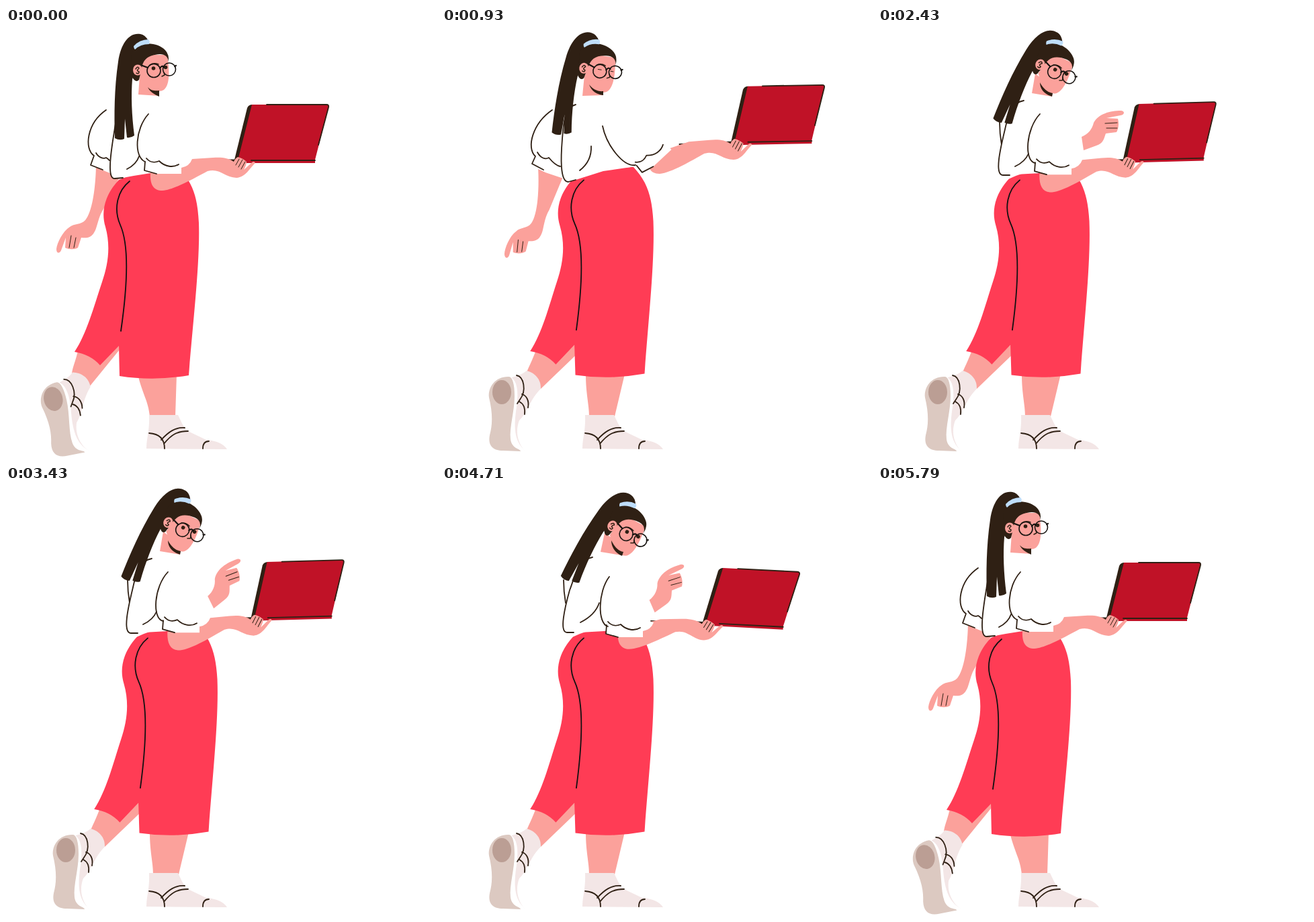
Write an HTML page that moves like this. It is 640 px wide and 640 px high and loops after 6000 ms.

```html
<!DOCTYPE html>
<html lang="en">
<head>
<meta charset="utf-8">
<title>Woman with a laptop</title>
<style>
html, body { margin: 0; width: 100%; height: 100%; overflow: hidden; background: #fff; }
svg { display: block; width: 100vw; height: 100vh; }
.skin { fill: #fba19b; }
.dark { fill: #2f2014; }
.white { fill: #fff; }
.shoe { fill: #f3e6e6; }
.red { fill: #c01227; }
.line { fill: none; stroke: #2f2014; stroke-width: 1.8; stroke-linecap: round; stroke-linejoin: round; }
.thin { stroke-width: 1; }
</style>
</head>
<body>
<svg viewBox="0 0 640 640">
  <g id="farArm">
    <path class="skin" d="M134 206C133 245 127 275 118 286C112 293 101 291 95 296C84 303 76 320 75 329C75 336 80 336 82 331L89 312L88 327C94 330 102 330 107 327L112 312C121 313 130 313 135 295C139 282 140 277 146 268L169 222L145 212Z"/>
    <path class="line thin" d="M97 309L94 327M104 312L101 327"/>
  </g>
  <path id="farSleeve" class="line" style="fill:#fff"/>
  <g id="reach">
    <g id="wave">
      <path class="skin" d="M303 162C313 158 319 150 321 141C328 128 345 123 362 123C368 124 367 129 361 130L340 134L357 135C359 142 358 150 355 155L339 157C336 165 336 171 325 175L306 182Z"/>
      <path class="line thin" d="M338 142L356 141M340 149L356 149"/>
    </g>
  </g>

  <path id="calf" class="skin"/>
  <path id="farCalf" class="skin"/>
  <g id="farFoot">
    <path class="shoe" d="M126 510C138 513 148 523 147 537C132 551 126 574 115 584C108 602 114 620 124 630L100 610L104 520Q118 517 126 510Z"/>
    <path class="white" d="M100 519C113 522 114 545 111 564C107 590 106 615 124 629Q122 631 114 630L98 610Z"/>
    <path fill="#dcc9c1" d="M100 519C80 518 68 534 70 550C76 575 75 592 71 606C68 622 76 629 91 629L117 630C117 626 104 627 102 612C100 595 108 570 108 548C108 530 105 520 100 519Z"/>
    <ellipse cx="89" cy="542" rx="14" ry="18" fill="#bb9e94"/>
    <path class="line" d="M111 517C122 519 126 540 116 553L112 559M119 545C126 547 130 555 128 565M115 556C121 559 124 566 123 575"/>
  </g>
  <path class="shoe" d="M213 576H256C262 588 265 598 275 602L298 613C314 614 325 620 329 627L209 626C209 610 214 600 213 576Z"/>
  <path class="line" d="M213 603C228 604 236 612 236 626M231 613C242 601 252 594 266 595M235 619C246 605 255 600 271 600M293 626C293 618 296 615 302 615"/>

  <g id="skirt">
    <path fill="#ff3c55" d="M168 226C150 245 140 270 148 296C156 325 152 352 143 378C130 417 120 455 102 482Q126 486 140 502L168 473L169 518Q220 526 272 517C278 440 289 350 287 290C285 255 280 233 258 209L215 212Q190 216 168 226Z"/>
    <path class="line" style="stroke:#111" d="M184 228C165 243 160 270 170 293C183 322 182 375 171 451"/>
  </g>

  <path id="torso" class="white"/>
  <path id="back" class="line"/>
  <path id="chest" class="line"/>

  <g id="forearm">
    <path class="line" d="M263 198.5L340 197"/>
    <path class="dark" d="M328 195.500H345V199H335Z"/>
    <path class="dark" d="M340 196L359 119Q361 114 367 114L347 199Z"/>
    <path class="red" d="M366 114H477Q481 114 480 118L460 196V201H357L345 197Z"/>
    <path class="line" d="M388 114H477Q481 114 480 118L465 174M365 197H460"/>
    <path class="skin" d="M215 214C214 231 218 242 233 242C250 241 281 223 300 213C318 208 325 222 343 223C357 222 362 209 371 201Q369 197 365 201L354 211C356 207 358 203 358 199Q353 194 345 192Q341 194 339 199C331 193 320 192 308 193L277 195L240 207Z"/>
    <path class="line thin" d="M347 195L342 204M352 196L346 207M356 199L350 210"/>
  </g>
  <g id="cuff">
    <path class="white" d="M207 198L206 212L224 217L261 217V208Q273 206 277 195L240 185Z"/>
    <path class="line" d="M207 199L206 212L224 217M209 194C216 202 223 200 228 198C237 207 249 208 257 203"/>
  </g>
  <path id="sleeve" class="line"/>

  <path id="neck" class="skin"/>
  <g id="head">
    <g id="pony" class="dark">
      <path d="M200 9C184 6 171 22 167 50C161 90 161 130 162 164Q169 168 176 165L177 135L180 163Q186 164 191 160C187 130 186 100 188 76L203 40L212 19Q207 10 200 9Z"/>
    </g>
    <path class="skin" d="M203 40H240C243 60 245 84 235 92Q232 94 228 94Q218 95 211 88L199 76Z"/>
    <path class="dark" d="M186 40C193 18 225 20 237 33Q243 39 242 51Q241 39 229 39C211 40 204 47 202 60L198 77Q194 82 189 75Z"/>
    <path fill="#bfdefb" d="M190 27Q199 17 212 17Q215 20 213 24Q200 24 192 32Q190 30 190 27Z"/>
    <ellipse class="skin" cx="196" cy="62.500" rx="7" ry="8"/>
    <path class="line" style="stroke-width:1.5" d="M193 61Q196 56 198 60Q193 64 198 65Q198 69 194 67M214 55Q220 51 227 54M232 72L236 70L235 66"/>
    <g id="eyes" class="dark"><circle cx="219.500" cy="60" r="2.800"/><circle cx="237.500" cy="58.500" r="2.800"/></g>
    <path id="lids" class="line thin" d="M217 61H222M236 61H240"/>
    <g class="line" style="stroke:#171310;stroke-width:1.600">
      <circle cx="220" cy="63.500" r="10"/><circle cx="243" cy="61.500" r="9.500"/>
      <path d="M203 56L211 59M229 60Q232 55 235 58M251 57L253 56" stroke-width="2.200"/>
    </g>
  </g>
  <path id="jaw" class="dark"/>
</svg>
<script>
const FRAME = 6000 / 84;

const stand = {
  head: 'translate(0 0) rotate(0 212 100)',
  pony: 'rotate(0 190 20)',
  neck: 'M199 70L197 99L228 101L228 85Z',
  jaw: 'M211 88C215 93 222 94 228 93L228 102C221 99 214 95 211 88',
  forearm: 'translate(0 0) rotate(0 350 205)',
  cuff: 'translate(0 0) rotate(0 207 198)',
  sleeve: 'M212 128C192 150 190 192 207 199',
  chest: 'M180 210Q194 203 198 191',
  back: 'M178 112C166 120 163 140 161 155C156 185 150 226 162 224L174 223',
  hem: 'L190 220L215 216L262 205L270 190L235 100Z',
  farArm: 'translate(0 0) rotate(0 150 125)',
  farSleeve: 'M149 122C120 142 116 180 131 190L126 204L144 211M134 186C138 193 145 195 149 193C151 194 153 196 154 197',
  reach: 'translate(-110 40)',
  skirt: 'translate(0 0) rotate(0 180 230)',
  calf: 'M196 515C203 545 212 555 214 578L252 578L254 515Z',
  farCalf: 'M107 480C104 495 99 505 98 514L124 534L168 480L168 470Z',
  farFoot: 'rotate(-13 124 629)'
};
const stretch = {
  head: 'translate(9.5 -0.7) rotate(8.6 212 100)',
  pony: 'rotate(-0.4 190 20)',
  neck: 'M212 70L209 101L240 100L240 85Z',
  jaw: 'M219 84C224 91 232 95 240 94L240 100C231 99 222 94 219 84',
  forearm: 'translate(90.5 -27) rotate(-1 350 205)',
  cuff: 'translate(82 6) rotate(-43 207 198)',
  sleeve: 'M239 146C245 175 270 207 288 204',
  chest: 'M205 212Q223 198 222 176',
  back: 'M199 114C182 118 181 140 179 165C177 190 175 229 188 229L199 226',
  hem: 'L240 213L288 206L320 180L290 140L250 100Z',
  farArm: 'translate(3.5 3) rotate(-4 150 125)',
  farSleeve: 'M164 122C135 142 125 178 139 191L134 202L151 211M142 185C147 194 154 196 159 193C164 199 170 205 176 206',
  reach: 'translate(-75 25)',
  skirt: 'translate(27 -1.6) rotate(-0.5 180 230)',
  calf: 'M214 515C214 545 219 560 219 578L257 578L272 515Z',
  farCalf: 'M139 482C134 495 130 503 126 512L147 537L198 488L198 470Z',
  farFoot: 'rotate(0 124 629)'
};
const draw = {
  ...stretch,
  head: 'translate(15.7 -3) rotate(15.3 212 100)',
  pony: 'rotate(-1.4 190 20)',
  neck: 'M221 70L217 99L248 100L248 86Z',
  jaw: 'M228 82C233 90 240 95 248 95L248 100C238 99 230 93 228 82',
  forearm: 'translate(67 -9.5) rotate(-1 350 205)',
  cuff: 'translate(61 9) rotate(-20 207 198)',
  sleeve: 'M238 140C234 165 245 207 268 208',
  chest: 'M204 210Q224 198 225 175',
  back: 'M206 111C186 116 187 140 184 155C177 190 175 224 184 224L198 223',
  hem: 'L240 214L270 212L310 195L290 130L250 100Z',
  farArm: 'translate(12 2) rotate(-25 150 125)',
  farSleeve: 'M172 127C150 145 149 190 164 199L161 211L178 216M165 193C167 197 171 199 174 199C175 199 176 199 177 199',
  reach: 'translate(-70 25)'
};
const work = {
  ...stretch,
  head: 'translate(28 -5) rotate(25 212 100)',
  pony: 'rotate(-1.8 190 20)',
  neck: 'M234 68L229 97L259 102L261 88Z',
  jaw: 'M241 81C245 89 252 96 260 97L259 102C249 99 241 92 241 81',
  forearm: 'translate(25 -0.5) rotate(-1.5 350 205)',
  cuff: 'translate(27 1.2) rotate(0 207 198)',
  sleeve: 'M241 128C220 150 217 198 234 201',
  chest: 'M204 206Q219 199 224 187',
  back: 'M217 108C195 112 193 135 188 155C182 180 173 219 186 219L196 219',
  hem: 'L205 218L241 216L290 212L300 185L300 160L270 100Z',
  farArm: 'translate(30 0) rotate(-45 150 125)',
  farSleeve: 'M181 140C181 152 182 163 184 174L184 174L184 174M184 174C184 174 184 174 184 174C184 174 184 174 184 174',
  reach: 'translate(0 0)'
};
const lean = {
  ...work,
  head: 'translate(38 0) rotate(28 212 100)',
  pony: 'rotate(-0.5 190 20)',
  neck: 'M242 70L236 98L267 103L271 89Z',
  jaw: 'M252 81C256 89 262 97 270 98L268 104C259 100 252 92 252 81',
  forearm: 'translate(47.5 7) rotate(3 350 205)',
  cuff: 'translate(38 8) rotate(0 207 198)',
  sleeve: 'M249 135C232 157 231 205 247 209',
  chest: 'M206 203Q228 192 234 174',
  back: 'M224 106C201 111 198 135 190 155C183 180 174 218 186 218L196 218',
  reach: 'translate(8 6)'
};

const el = id => document.getElementById(id);
const clamp = x => Math.min(1, Math.max(0, x));
const ease = (x, n) => x < .5 ? (2 * x) ** n / 2 : 1 - (2 - 2 * x) ** n / 2;
const ramp = (k, from, to, n = 2) => ease(clamp((k - from) / (to - from)), n);

function mix(a, b, p) {
  const end = b.match(/-?[\d.]+/g);
  let i = 0;
  return a.replace(/-?[\d.]+/g, v => (+v + (end[i++] - v) * p).toFixed(2));
}

function blend(a, b, p) {
  const pose = {};
  for (const part in a) pose[part] = mix(a[part], b[part], p);
  return pose;
}

function poseAt(k) {
  if (k <= 13) return blend(stand, stretch, ramp(k, 4, 13));
  if (k <= 29) {
    const p = ramp(k, 13, 29, 3), mid = .335;
    return p < mid ? blend(stretch, draw, p / mid) : blend(draw, work, (p - mid) / (1 - mid));
  }
  if (k <= 66) return blend(work, lean, ramp(k, 57, 65));
  if (k <= 72) return blend(lean, work, ramp(k, 66, 72));
  return blend(work, stand, ramp(k, 72, 81));
}

// Pointing hand: angles of each wave, one per step.
const REST = -15;
const waves = [[34, [0, 15, 0, -20, -34, REST]], [45, [0, 15, 2, -18, -34, -18, 0, 14, -4, REST]]];
function waveAngle(k) {
  for (const [start, angles] of waves) {
    if (k >= start && k < start + angles.length) return angles[k - start];
  }
  return REST;
}

function render(ms) {
  const k = Math.floor((ms % 6000) / FRAME + .07) % 84;
  const { hem, ...pose } = poseAt(k);
  for (const part in pose) {
    const node = el(part);
    node.setAttribute(node.tagName === 'g' ? 'transform' : 'd', pose[part]);
  }
  el('torso').setAttribute('d', pose.back + hem);
  el('wave').setAttribute('transform', `rotate(${waveAngle(k)} 308 172)`);
  const blink = Math.abs(k - 13) < 2 || Math.abs(k - 60) < 2;
  el('eyes').style.display = blink ? 'none' : '';
  el('lids').style.display = blink ? '' : 'none';
}

const begin = performance.now();
function tick() {
  render(performance.now() - begin);
  requestAnimationFrame(tick);
}
tick();
</script>
</body>
</html>
```
